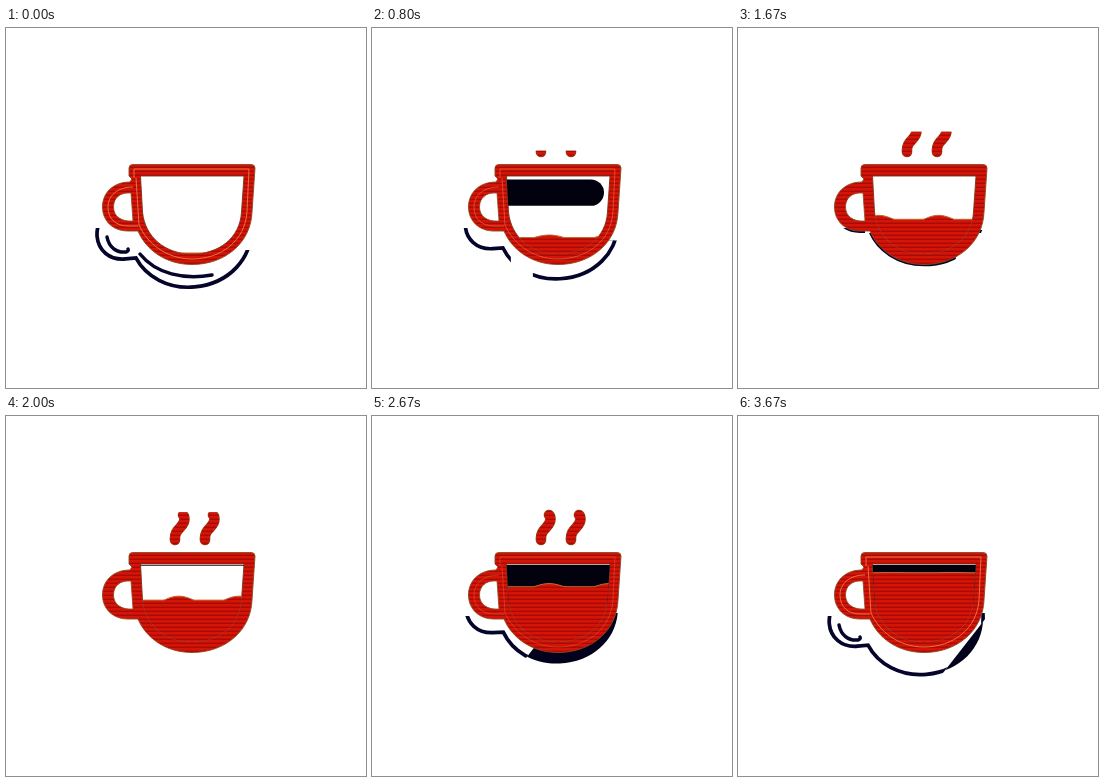
These frames come from a looping animation (360x360 px, 3740 ms). An HTML page:

```html
<!DOCTYPE html>
<html lang="en">
<head>
<meta charset="utf-8">
<title>Filling cup</title>
<style>
html, body { margin: 0; width: 100%; height: 100%; overflow: hidden; background: #fff; }
svg { display: block; width: 100vw; height: 100vh; }
</style>
</head>
<body>
<svg viewBox="0 0 360 360">
  <defs>
    <pattern id="red" width="8" height="4" patternUnits="userSpaceOnUse">
      <rect width="8" height="4" fill="#d51408"/>
      <rect y="2.6" width="8" height="1.4" fill="#a80a05"/>
    </pattern>
    <path id="outer" d="M127 136.500H245Q249 136.500 249 140L246 184C245 214 220 236.500 186 236.500C160 236.500 140 222 132 203H122C106 203 96.500 192 96.500 179C96.500 165 107 154 124 154L126 151L123 148V140Q123 136.500 127 136.500Z"/>
    <path id="hole" d="M125 165C114 164 107.500 170 107.500 179C107.500 188 115 194 127 193Z"/>
    <path id="inner" d="M134.500 148H238L235.500 184C234 210 213 226 186 226C159 226 139 209 136.500 184Z"/>
    <path id="steam" d="M169 124C168 112 178.500 112 178.500 103Q178.500 100 177 99"/>
    <clipPath id="inside"><use href="#inner"/></clipPath>
    <clipPath id="lower"><path id="lowerPath"/></clipPath>
    <clipPath id="paleClip"><rect id="paleRect" x="-300" y="-125" height="260"/></clipPath>
    <clipPath id="steamClip"><rect id="steamRect" x="150" width="80"/></clipPath>
  </defs>
  <rect width="360" height="360" fill="#fff"/>

  <g id="shadow">
    <g clip-path="url(#lower)">
      <use id="shade" href="#outer" fill="#02021c"/>
      <g clip-path="url(#paleClip)">
        <use id="pale" href="#outer" fill="#fff" stroke="#05052c" stroke-width="3.6"/>
      </g>
    </g>
    <g fill="none" stroke="#05052c" stroke-width="3.5" stroke-linecap="round">
      <path id="innerArc" d="M134 226C150 246 178 252 206 247"/>
      <path id="handleArc" d="M101 209C103 219 110 225 120 224Q123 223 122 221"/>
    </g>
    <rect id="gap" y="205" height="60" fill="#fff"/>
  </g>

  <use href="#outer" fill="url(#red)" stroke="#8c4a20" stroke-width=".9"/>
  <use href="#hole" fill="#fff" stroke="#8c4a20" stroke-width=".8"/>
  <use href="#inner" fill="#fff" stroke="#7c3418" stroke-width=".9"/>
  <g clip-path="url(#inside)">
    <rect id="bar" x="122" width="110" fill="#02020e"/>
    <rect id="fill" x="130" y="149" width="112" fill="#02020e"/>
    <g id="glints" fill="#0b0950">
      <ellipse cx="165" cy="162" rx="6" ry="2"/>
      <ellipse cx="194" cy="162" rx="6" ry="2"/>
    </g>
    <g id="glow">
      <rect x="135" y="158" width="104" height="4" fill="#07073a"/>
      <path d="M161 178C160 170 165 167 174 167C188 168 191 172 200 174V179Z" fill="#fff"/>
    </g>
    <path id="liquid" fill="url(#red)" stroke="#c46a30"/>
  </g>
  <path id="seam" fill="none" stroke="#f08a50" d="M128 150V141H243L241 184C239 213 215 231 186 231C160 231 141 215 133 197L130 150M127 159C111 159 102 168 102 179C102 191 110 198 122 198H132"/>
  <g clip-path="url(#steamClip)" fill="none" stroke-linecap="round">
    <g stroke="#8c4a20" stroke-width="10.6"><use href="#steam"/><use href="#steam" x="30"/></g>
    <g stroke="url(#red)" stroke-width="9.4"><use href="#steam"/><use href="#steam" x="30"/></g>
  </g>
</svg>
<script>
const LOOP = 3740, STEPS = 56, MIDDLE = LOOP / 2;
const { PI, sin, cos, abs, max, min, sqrt, floor } = Math;
const $ = id => document.getElementById(id);
const set = (id, attrs) => {
  for (const k in attrs) $(id).setAttribute(k, attrs[k]);
};
const show = (id, on) => set(id, { visibility: on ? "inherit" : "hidden" });
const ramp = (t, from, to) => min(1, max(0, (t - from) / (to - from)));

// The shadow slides under the cup by mid-loop, then back out.
function shadow(t) {
  const early = t < MIDDLE;
  const out = ramp(abs(t - MIDDLE), 200, MIDDLE);
  const slide = out ** 0.7;
  const transform = `translate(${-3 * out} ${21 * slide})
    rotate(${-5.5 * slide} 186 180) translate(186 180) scale(${1 + 0.03 * slide}) translate(-186 -180)`;
  set("shade", { transform });
  set("pale", { transform });
  show("shadow", out > 0);

  const right = early ? 202 + 20 * out : 197;
  set("lowerPath", { d: `M80 200H127V205H200V${right}H260V280H80Z` });
  const edge = early ? 360 : 95 + 135 * sqrt(ramp(t, 2270, 3670));
  set("paleRect", {
    width: 300 + edge,
    transform: `translate(0 225) skewX(${early ? 0 : -38})`
  });
  show("innerArc", early && out > 0.9);
  show("handleArc", out > 0.9);
  set("gap", { x: 66 + t / 11, width: 6 + t / 50 });
  show("gap", early);
}

function interior(t) {
  const swell = ramp(t, 0, 1670);
  const top = 149 + 5 * swell;
  const height = max(0, 149 + 32 * sin(PI * swell ** 0.6) - top);
  set("bar", { y: top, height, rx: height / 2 });
  set("fill", { height: 40 * ramp(t, 2000, 2200) });
  show("glints", abs(t - 500) < 200);
  show("glow", abs(t - 2300) < 130);
}

function liquid(p) {
  const level = 225 - 69 * p - 5 * sin(PI * p * p);
  const amp = 4 * sin(PI * p);
  const crest = 100 + 360 * p;
  let d = "M128 240";
  for (let x = 128; x <= 244; x += 2) {
    const bump = max(0, cos((x - crest) * PI / 30));
    d += `L${x} ${(level - amp * bump).toFixed(2)}`;
  }
  set("liquid", { d: d + "V240Z" });
}

function steam(t) {
  const y = 130 - 38 * ramp(t, 470, 2200);
  const bottom = 131 - 39 * ramp(t, 2670, 3500);
  set("steamRect", { y, height: max(0, bottom - y) });
}

function draw(now) {
  const step = floor(((now % LOOP) + 5) * STEPS / LOOP) % STEPS;
  const p = step / STEPS, t = p * LOOP;
  shadow(t);
  interior(t);
  liquid(p);
  steam(t);
  set("seam", { opacity: 0.8 * cos(PI * p) ** 2 });
}

let start;
function tick(now) {
  start ??= now;
  draw(now - start);
  requestAnimationFrame(tick);
}
draw(0);
requestAnimationFrame(tick);
</script>
</body>
</html>
```
